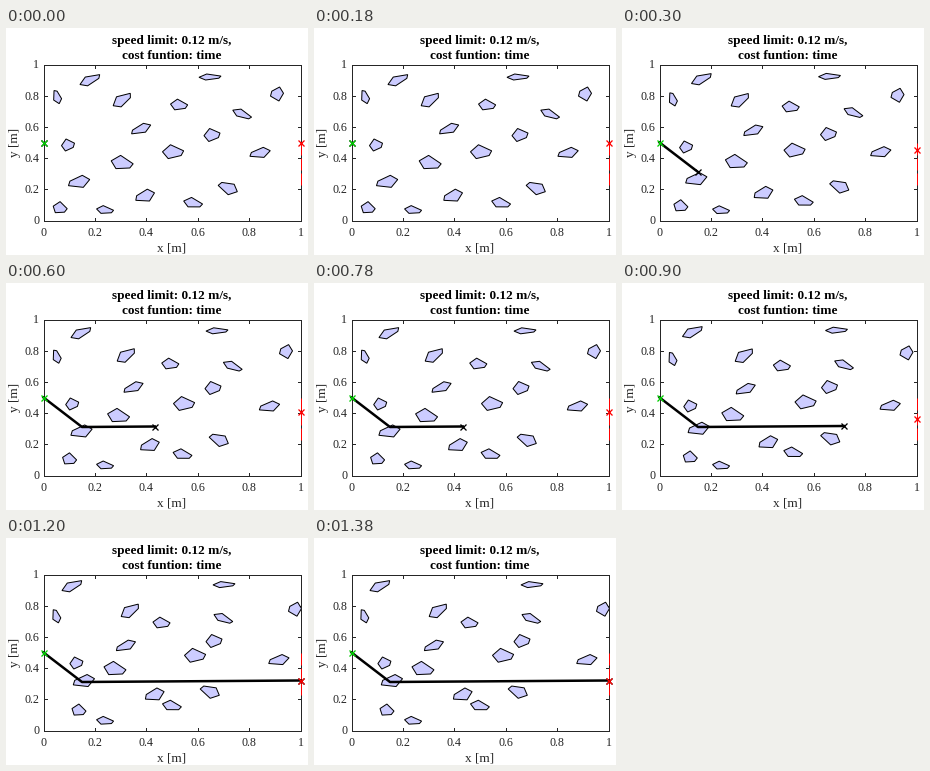
Write a matplotlib script that moves like this. It is 302 px wide and 227 px high and loops after 1500 ms.

```python
import numpy as np
import matplotlib.pyplot as plt
from matplotlib.animation import FuncAnimation
from matplotlib.patches import Polygon, Rectangle

W, H, DPI = 302, 227, 100
STEPS, HOLD = 5, 300
L, R, T, B = 37.5, 294.5, 36.5, 192.5
INK = "#262626"
PT = 72 / DPI

plt.rcParams["font.family"] = "Liberation Serif"
fig = plt.figure(figsize=(W / DPI, H / DPI), dpi=DPI, facecolor="white")
ax = fig.add_axes([0, 0, 1, 1])
ax.set(xlim=(0, W), ylim=(H, 0))
ax.axis("off")

# centre x, y, drift per step x, y, half length, half width, heading
OBSTACLES = [
    (84, 52, -4.5, -1, 11, 4.5, -22),
    (51, 69, -0.2, 2.3, 7, 4, -105),
    (116, 72, 2, 0.2, 10.5, 5.5, -30),
    (204, 49, 3.5, -0.6, 11, 3, 0),
    (173, 77, -4.4, 2, 8.5, 5.5, 10),
    (236, 86, -4.7, -1.4, 10, 4, 25),
    (271, 66, 4.5, 1.3, 6.5, 7, 180),
    (135, 101, -3.8, 1.7, 10.5, 4.5, 160),
    (206, 107, 0.5, -1, 8, 6.5, 0),
    (62, 117, 2.1, 2, 6.5, 6, 0),
    (167, 124, 5.5, -1.6, 10.5, 7, 5),
    (254, 125, 4.7, -0.7, 10.5, 5, 170),
    (116, 135, -1.8, -1, 11, 7, 15),
    (73, 154, 1.2, -2.7, 11, 6, 170),
    (222, 160, -4.5, -1.6, 10, 6, 205),
    (139, 168, 2.4, -2.8, 10, 6, 165),
    (54, 180, 4.7, -1.9, 7, 6, 20),
    (99, 182, 0, 0.2, 8.5, 4, 10),
    (187, 175, -5.3, -1.8, 9.5, 5, 15),
]
# blunt end on the left, narrow end on the right
PEBBLE = np.array([(1, -0.3), (0.8, 0.4), (-0.4, 1), (-1, 0.1), (-0.3, -1)])

frame = Rectangle((L, T), R - L, B - T, fill=False, ec=INK, lw=PT, zorder=2)
ax.add_patch(frame)


def line(x, y, color, width, **kw):
    return ax.plot(x, y, color=color, lw=width * PT, **kw)[0]


def cross(color):
    return line([], [], color, 1, marker="x", ms=6 * PT, mew=1.3 * PT, zorder=6)


def label(x, y, s, size, **kw):
    kw = {"ha": "center", "va": "baseline", "color": INK, **kw}
    ax.text(x, y, s, fontsize=size * PT, **kw)


def outline(length, width, heading):
    a = np.radians(heading)
    turn = np.array([(np.cos(a), np.sin(a)), (-np.sin(a), np.cos(a))])
    return PEBBLE * (length, width) @ turn


for v in np.linspace(0, 1, 6):
    x, y = L + v * (R - L), B - v * (B - T)
    for edge, d in ((B, -3), (T, 3)):
        line([x, x], [edge, edge + d], INK, 1, zorder=2)
    for edge, d in ((L, 3), (R, -3)):
        line([edge, edge + d], [y, y], INK, 1, zorder=2)
    label(x, 208, f"{v:.1g}", 12)
    label(33, y + 4, f"{v:.1g}", 12, ha="right")

label(166, 16, "speed limit: 0.12 m/s,", 13.3, weight="bold", color="black")
label(166, 31, "cost funtion: time", 13.3, weight="bold", color="black")
label(166, 223.5, "x [m]", 13.3)
label(15, 114.5, "y [m]", 13.3, rotation=90, va="center", ha="right")

shapes = []
for cx, cy, dx, dy, *form in OBSTACLES:
    p = Polygon(outline(*form), fc="#ccccff", ec="black", lw=PT, zorder=3)
    ax.add_patch(p)
    p.set_clip_path(frame)
    shapes.append((p, outline(*form) + (cx, cy), np.array((dx, dy))))

START, BEND, END = (L, 114.5), (76, 144), (R, 142.5)
line([R, R], [114.5, 157], "red", 1, dashes=(12, 3), zorder=4)
path = line([], [], "black", 2.5, zorder=5, solid_joinstyle="round")
tip, start, goal = cross("black"), cross("#00d000"), cross("red")
start.set_data([START[0]], [START[1]])


def route(k):
    if k == 0:
        return [START]
    s = (k - 1) / (STEPS - 2)
    end = tuple(a + (b - a) * s for a, b in zip(BEND, END))
    return [START, BEND, end]


def update(k):
    for p, pts, drift in shapes:
        p.set_xy(pts + k * drift)
    xs, ys = zip(*route(k))
    path.set_data(xs, ys)
    tip.set_data(xs[-1:], ys[-1:])
    goal.set_data([R], [114.5 + 7 * k])
    return []


anim = FuncAnimation(fig, update, frames=STEPS, interval=HOLD, repeat=True,
                     init_func=lambda: [])
plt.show()
```
